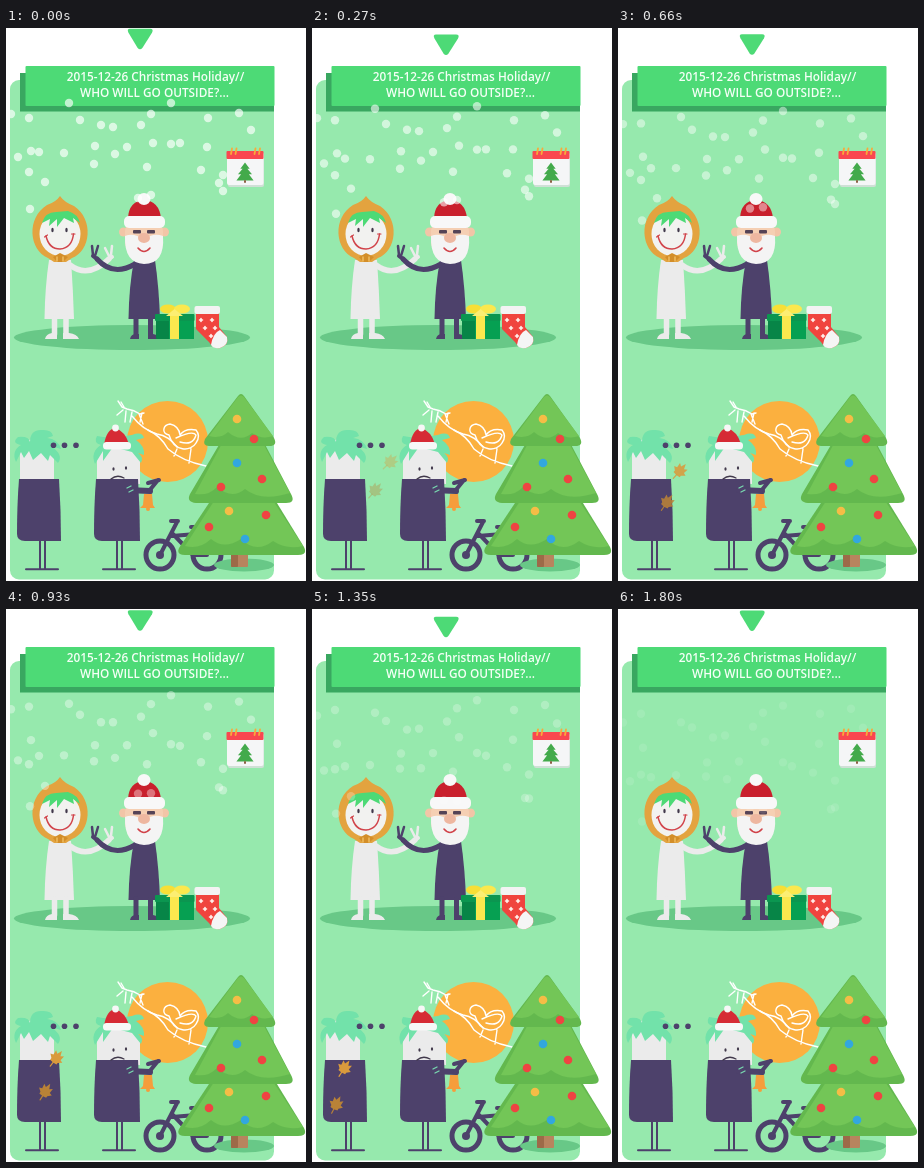
Recreate the animation shown at these times as an HTML page with a canvas. Size 300 by 553 pixels, loop 1.83 s.

```html
<!DOCTYPE html>
<html lang="en">
<head>
<meta charset="utf-8">
<title>Christmas Holiday</title>
<style>
html, body { margin: 0; width: 100%; height: 100%; overflow: hidden; background: #fff; }
canvas { display: block; width: 300px; height: 553px; }
</style>
</head>
<body>
<canvas id="stage"></canvas>
<script>
const W = 300, H = 553, LOOP = 1830;
const ratio = window.devicePixelRatio || 1;
const GREEN = '#4dda76', PURPLE = '#4d416b', PALE = '#ebebeb', RED = '#e83b43',
  ORANGE = '#e3a33f', TEAL = '#72e2aa', GROUND = '#68c887';

function sized(canvas) {
  canvas.width = W * ratio;
  canvas.height = H * ratio;
  const c = canvas.getContext('2d');
  c.scale(ratio, ratio);
  c.lineCap = c.lineJoin = 'round';
  return c;
}
const stage = sized(document.getElementById('stage'));
const backdrop = document.createElement('canvas');
let g = sized(backdrop);

function fill(color, d) {
  g.fillStyle = color;
  g.fill(new Path2D(d));
}
function line(color, width, d) {
  g.strokeStyle = color;
  g.lineWidth = width;
  g.stroke(new Path2D(d));
}
function oval(color, x, y, rx, ry = rx) {
  g.fillStyle = color;
  g.beginPath();
  g.ellipse(x, y, rx, ry, 0, 0, Math.PI * 2);
  g.fill();
}
function box(color, x, y, w, h, r = 0) {
  g.fillStyle = color;
  g.beginPath();
  g.roundRect(x, y, w, h, r);
  g.fill();
}
function fir(color, x, y, s) {
  g.save();
  g.translate(x, y);
  g.scale(s, s);
  fill(color, 'M0 0L6 8H3L9 15H5L11 23H-11L-5 15H-9L-3 8H-6Z');
  g.restore();
}

function header() {
  box('#96e9ad', 4, 52, 264, 499.5, 9);
  fill('#39a760', 'M14 45H268V83.5H14Z');
  box(GREEN, 19.5, 38, 249, 40, 1);
  g.fillStyle = '#f4fff6';
  g.font = '600 11.8px "Open Sans", sans-serif';
  g.textAlign = 'center';
  g.fillText('2015-12-26 Christmas Holiday//', 149.5, 53);
  g.fillText('WHO WILL GO OUTSIDE?...', 148.5, 68.5);
}

function calendar() {
  box('#cfe0d6', 222, 125, 36, 34, 2);
  box('#f5f6f7', 221, 124, 36.5, 33, 2);
  box('#f9474f', 220.5, 123, 37, 8, 1);
  for (const x of [225, 229.5, 248.5, 253]) line('#f9a93b', 1.8, `M${x} 126L${x + 1} 120.5`);
  fir('#43aa4b', 239, 134.5, 0.78);
  line('#8b6244', 2, 'M239 153V154');
}

function hoodedFriend() {
  fill(PALE, 'M43 232H65Q67 260 68 291H38.5Q39 258 43 232Z');
  line(PALE, 5.5, 'M48.5 290V306M60 290V306');
  fill(PALE, 'M51 311H39Q40 306 46 305H51ZM57 305H63Q71 306 73 311H57Z');
  line(PALE, 5.5, 'M64 237Q82 251 103 231');
  line(PALE, 4, 'M102 231L106 229');
  line(PALE, 2.5, 'M103 228L99 220M105 227L106 218');
  fill(ORANGE, 'M54 168Q58 174 68 178C88 191 85 223 66 230L60 234H48L42 230C23 222 20 190 41 177Q50 174 54 168Z');
  oval('#f2f2f0', 54, 206, 20.5, 22);
  fill(GREEN, 'M36 195Q39 184 50 184L62 183Q72 186 74 195L67 190 68 195 58 190 51 199 51 191 43 198 44 191Z');
  oval('#41394b', 46.5, 202, 1.2, 2.2);
  oval('#41394b', 60.5, 202, 1.2, 2.2);
  line('#d1434a', 1.5, 'M40 208Q43 221 54 221Q66 220 67.5 206');
  line('#d1434a', 1.2, 'M38.5 209L41.5 207M65.5 206L69 206');
  fill('#d38e29', 'M47 229L54 225L62 229L57 234H51Z');
  line('#f1bf63', 1.4, 'M51 229V233M57 229V233');
}

function santa() {
  fill(PURPLE, 'M128 232H149Q153 260 154 291H122.5Q123 258 128 232Z');
  line(PURPLE, 5, 'M130 290V306M144.5 290V306');
  fill(PURPLE, 'M133 311H124Q125 306 130 306H133ZM142 306H147Q153 307 154 311H142Z');
  line(PURPLE, 5, 'M129 236Q107 249 91 231');
  line(PURPLE, 4, 'M91 231L87 228');
  line(PURPLE, 2.5, 'M89 228L92 218M87 227L86 218');
  oval('#f2c5a7', 117.5, 204, 4.5);
  oval('#f2c5a7', 158.5, 204, 4.5);
  box('#f5cfb3', 119, 195, 38, 28, 8);
  fill('#f4f4f4', 'M119 208Q128 204 138 212Q147 204 157 208Q159 236 138 236Q118 235 119 208Z');
  oval('#eeb7a0', 138, 210, 6, 5);
  box('#554356', 127, 202, 8, 3.5, 1);
  box('#554356', 141, 202, 8, 3.5, 1);
  line('#d1434a', 1.6, 'M132 220Q138 227 144 220');
  fill('#c9202d', 'M122 190Q123 173 138 172Q153 173 155 190Z');
  box('#f8f8f8', 118, 188, 41, 12, 5);
  oval('#f8f8f8', 138, 171, 6.5, 6);
}

function presents() {
  box('#078547', 150, 290, 38, 21, 1);
  box('#06a052', 163, 290, 25, 21);
  box('#0b9650', 149, 286, 39.5, 7, 1);
  box('#fbe84e', 164, 286, 9, 25);
  oval('#f7df36', 162, 281, 8, 4.5);
  oval('#fbe84e', 176, 281, 8, 4.5);
  fill('#fcee72', 'M168.5 281L160 288H177Z');
  fill('#f0443e', 'M190 284H213V299L221 309Q223 317 214 320Q207 321 203 314L190 301Z');
  fill('#f5f5f5', 'M214 302L221 309Q223 317 214 320Q208 321 205 317Q207 305 214 302Z');
  box('#f3f3f3', 188.5, 278, 25.5, 8, 2);
  for (const [x, y] of [[195, 292], [206, 292], [199, 300], [209, 300], [205, 308]]) {
    line('#fff3ee', 1.6, `M${x - 1.5} ${y}h3M${x} ${y - 1.5}v3`);
  }
}

function moon() {
  oval('#fbb03f', 161.5, 413.5, 40.5);
  line('#fff', 1.4, 'M112 373L116 379 121 381Q128 382 134 386L138 385M115 374L118 379M117 382L111 387M120 383L119 394M126 384L124 394M133 386L137 396M136 385L134 394M126 388Q137 402 151 406Q163 408 171 419');
  line('#fff', 1.4, 'M142 402Q155 408 162 421Q176 433 200 438M164 396C157 397 155 405 163 407C168 424 185 424 190 415Q195 408 190 402Q179 400 174 407Q173 398 164 396M170 410Q187 402 190 407Q187 418 174 414M171 421L168 428M185 421L183 435');
}

function bodyOnPole(x, right) {
  fill(PURPLE, `M${x + 1} 451H${right - 2}Q${right} 482 ${right} 513H${x + 7}Q${x - 1} 513 ${x - 1} 506Q${x - 1} 477 ${x + 1} 451Z`);
}
function pole(x) {
  line(PURPLE, 2, `M${x} 513V541M${x + 5} 513V541M${x - 14} 541.3H${x + 18}`);
}

function leafyPair() {
  pole(34);
  fill(PALE, 'M14 452V423Q15 411 31 411Q47 411 48 430V452Z');
  bodyOnPole(12, 55);
  fill(TEAL, 'M10 434Q5 423 15 417Q5 415 12 409Q23 408 24 414Q24 402 35 402Q46 401 47 408L41 410Q52 411 55 421L45 418Q58 427 52 435L44 427 42 433 35 425 27 432 23 423 18 430 15 424Z');
  for (const x of [47.5, 58.5, 70]) oval(PURPLE, x, 417.3, 2.8);

  pole(111);
  fill(PALE, 'M91 456V425Q94 414 111 413Q132 413 134 433V456Z');
  fill(TEAL, 'M89 436Q84 424 95 417Q87 415 91 408L104 410 126 407Q136 403 138 410L130 412Q139 418 138 427L132 425Q138 429 135 435L126 424 107 419 97 433 97 423Z');
  bodyOnPole(89, 134);
  fill('#d62b35', 'M98 416Q101 401 109 400Q119 403 123 416Z');
  box('#f7f7f7', 97, 414, 28, 7.5, 3.5);
  oval('#f7f7f7', 109.5, 400, 3.4);
  oval('#41394b', 107.5, 441, 1.1, 1.8);
  oval('#41394b', 120, 440, 1.1, 1.8);
  line('#41394b', 1.3, 'M105 451Q111 446 118 450');
  line(PURPLE, 6, 'M121 462L144 463');
  line(PURPLE, 4, 'M143 463L152 452M142 455L153 452');
  line('#78d9b0', 1.3, 'M121 460L125 458M123 464L127 462');
  fill('#f59d3c', 'M138 466H146L147 477 149 480H134L137 477Z');
  oval('#f59d3c', 142, 481, 2);
}

function bike() {
  line(PURPLE, 5, 'M140 527a14 14 0 1 0 28 0a14 14 0 1 0 -28 0M187 527a14 14 0 1 0 28 0a14 14 0 1 0 -28 0');
  line(PURPLE, 4, 'M172 493H165M171 494L154 527M167 506L187 527H201L190 506L166 508M190 505V499M185 499H195');
  oval(PURPLE, 154, 527, 4);
}

function bigTree() {
  oval(GROUND, 238, 537, 30, 6.5);
  box('#b8845e', 225, 524, 17, 15, 1);
  box('#9d6a48', 225, 524, 7, 15, 1);
  fill('#63b84e', 'M217 454L173 520Q170 527 179 527H292Q302 527 298 519L258 454Z');
  fill('#73c657', 'M219 456L179 518Q193 522 205 511Q218 522 235 511Q250 526 267 513Q281 522 297 518L256 456Z');
  fill('#63b84e', 'M220 405L184 466Q180 474 190 475H280Q290 475 285 466L253 405Z');
  fill('#73c657', 'M221 406L189 466Q203 468 211 459Q226 472 239 461Q255 474 284 465L252 406Z');
  fill('#63b84e', 'M232 368L199 411Q196 418 203 418H263Q272 418 268 410L238 368Q235 364 232 368Z');
  fill('#73c657', 'M232 369L203 408Q215 411 222 404Q235 415 246 405Q256 412 267 408L238 369Q235 366 232 369Z');
  const balls = {
    '#f5bd46': [[231, 391], [223, 483]],
    '#ef4442': [[248, 411], [215, 459], [256, 451], [260, 487], [203, 499]],
    '#32a7df': [[231, 435], [239, 511]]
  };
  for (const color in balls) for (const [x, y] of balls[color]) oval(color, x, y, 4.3);
}

header();
calendar();
oval(GROUND, 126, 309.5, 118, 12.5);
hoodedFriend();
santa();
presents();
moon();
leafyPair();
bike();
bigTree();
g = stage;

// x, starting y, total fall
const flakes = [
  [5, 86, 28], [63, 75, 39], [165, 75, 22], [23, 90, 15], [74, 92, 27],
  [95, 97, 32], [107, 99, 28], [135, 97, 21], [145, 86, 18], [202, 90, 15],
  [233, 85, 15], [245, 102, 17], [89, 118, 36], [121, 119, 34], [147, 115, 18],
  [165, 116, 38], [174, 115, 43], [201, 119, 16], [33, 124, 45], [25, 123, 16],
  [12, 129, 44], [58, 125, 42], [88, 136, 32], [109, 126, 45], [141, 139, 32],
  [195, 142, 22], [23, 144, 22], [39, 154, 45], [217, 147, 25], [213, 155, 46],
  [217, 163, 36], [145, 167, 34], [132, 170, 29], [24, 181, 32]
];

function snow(p) {
  g.globalAlpha = 0.66 - 0.56 * p;
  for (const [x, y, fall] of flakes) oval('#fff', x, y + fall * p, 4.2);
  g.globalAlpha = 1;
}

function leaf(color, x, y, angle, alpha) {
  g.save();
  g.globalAlpha = alpha;
  g.translate(x, y);
  g.rotate(angle);
  fill(color, 'M0 -9L2 -4 5 -6 4.5 -1 7.5 0 4 3 4 5 0 5.5 -4 5 -4 3 -7.5 0 -4.5 -1 -5 -6 -2 -4Z');
  line(color, 1.2, 'M0 5V10');
  g.restore();
}

function leaves(t) {
  const alpha = Math.max(0, Math.min(1, t / 750, (1800 - t) / 250));
  const turn = 0.75 - t * 0.0002;
  leaf('#d99a3c', 90 - t * 0.0426, 427.5 + t * 0.0233, turn + 0.1, alpha);
  leaf('#b98237', 73 - t * 0.0361, 454 + t * 0.0306, turn, alpha);
}

function pointer(t) {
  const y = 0.8 + 7 * Math.abs(Math.sin(Math.PI * t / 915));
  fill(GREEN, `M124 ${y}H144Q148 ${y} 146 ${y + 4}L136.5 ${y + 19}Q134 ${y + 22} 131.5 ${y + 19}L122.5 ${y + 4}Q120.5 ${y} 124 ${y}Z`);
}

function draw(now) {
  const t = now % LOOP;
  g.clearRect(0, 0, W, H);
  g.fillStyle = '#fff';
  g.fillRect(0, 0, W, H);
  g.drawImage(backdrop, 0, 0, W, H);
  pointer(t);
  leaves(t);
  snow(t / LOOP);
}

let start;
function tick(now) {
  start ??= now;
  draw(now - start);
  requestAnimationFrame(tick);
}
requestAnimationFrame(tick);
</script>
</body>
</html>
```
